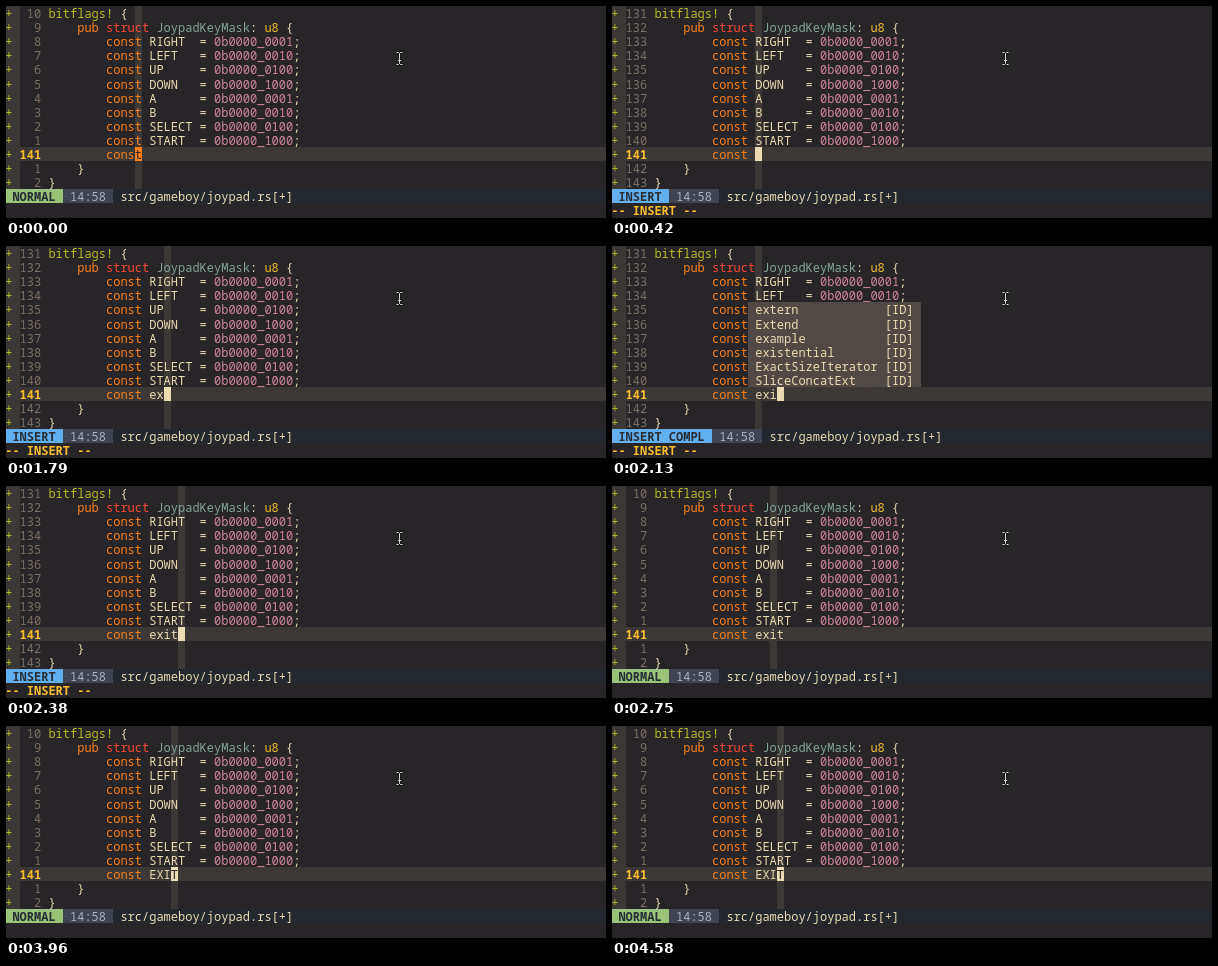
Recreate the animation shown at these times as an HTML page with a canvas. Size 600 by 212 pixels, loop 4.62 s.

```html
<!DOCTYPE html>
<html>
<head>
<meta charset="utf-8">
<style>
html, body { margin: 0; width: 100%; height: 100%; overflow: hidden; background: #272527; }
canvas { display: block; }
</style>
</head>
<body>
<canvas id="stage" width="600" height="212"></canvas>
<script>
const ctx = document.getElementById('stage').getContext('2d');
const LOOP = 4620, CW = 7.2, RH = 14.1, LEFT = -0.8, CURRENT = 10;
const C = {
  bg: '#272527', line: '#3c3836', menu: '#504945', fg: '#ebdbb2', dim: '#7c6f64',
  orange: '#fe8019', red: '#fb4934', yellow: '#fabd2f', green: '#b8bb26',
  blue: '#83a598', purple: '#d3869b',
  bar: '#23272e', clock: '#3e4452', normal: '#98c379', insert: '#61afef', dark: '#282c34'
};

const masks = ['RIGHT', 'LEFT', 'UP', 'DOWN', 'A', 'B', 'SELECT', 'START'];
const bits = ['0001', '0010', '0100', '1000'];
const matches = ['extern', 'Extend', 'example', 'existential', 'ExactSizeIterator', 'SliceConcatExt'];
const prompt = 'Select Inflection (p P C c t U T h S O o L - _):';

// Each step changes part of the editor state from the given time on.
const steps = [
  [0, { mode: 'NORMAL', word: '', cursor: 18, column: 18, menu: false, prompt: false }],
  [290, { mode: 'INSERT', cursor: 19, column: 19 }],
  [420, { cursor: 20, column: 20 }],
  [1540, { word: 'e', cursor: 21, column: 21 }],
  [1700, { word: 'ex', cursor: 22, column: 22 }],
  [1960, { mode: 'INSERT COMPL', menu: true, column: 20 }],
  [2110, { word: 'exi', cursor: 23 }],
  [2230, { mode: 'INSERT', menu: false, word: 'exit', cursor: 24, column: 24 }],
  [2730, { mode: 'NORMAL', cursor: -1, column: 22 }],
  [2780, { cursor: 23, column: 23 }],
  [3100, { prompt: true, cursor: -1 }],
  [3600, { prompt: false, word: 'EXIT', cursor: 23 }]
];

const x = col => LEFT + col * CW;
const y = row => row * RH;

function box(col, row, cols, rows, color) {
  const left = Math.max(0, Math.round(x(col))), top = Math.round(y(row));
  ctx.fillStyle = color;
  ctx.fillRect(left, top, Math.round(x(col + cols)) - left, Math.round(y(row + rows)) - top);
}

function text(col, row, string, color, bold) {
  ctx.font = (bold ? 'bold ' : '') + '12px "Noto Sans Mono", monospace';
  ctx.fillStyle = color;
  [...string].forEach((ch, i) => ctx.fillText(ch, x(col + i), Math.round(y(row)) + 12));
}

// Takes alternating strings and colours, set one after another.
function run(col, row, ...parts) {
  for (let i = 0; i < parts.length; i += 2) {
    text(col, row, parts[i], parts[i + 1]);
    col += parts[i].length;
  }
}

function gutter(insert) {
  box(0, 0, 2, 13, C.line);
  for (let row = 0; row < 13; row++) {
    text(0, row, '+', C.green);
    const here = row === CURRENT;
    const number = insert || here ? 131 + row : Math.abs(row - CURRENT);
    text(2, row, String(number).padStart(3), here ? C.yellow : C.dim, here);
  }
}

function code(word) {
  run(6, 0, 'bitflags!', C.green, ' {', C.fg);
  run(10, 1, 'pub ', C.orange, 'struct ', C.red, 'JoypadKeyMask', C.blue, ': ', C.fg, 'u8', C.yellow, ' {', C.fg);
  masks.forEach((name, i) => run(14, i + 2, 'const ', C.orange, name.padEnd(7) + '= ', C.fg,
    '0b0000_' + bits[i % 4], C.purple, ';', C.fg));
  run(14, CURRENT, 'const ', C.orange, word, C.fg);
  text(10, 11, '}', C.fg);
  text(6, 12, '}', C.fg);
}

function status(mode, insert) {
  const end = mode.length + 2;
  box(0, 13, 90, 1, C.bar);
  box(0, 13, end, 1, insert ? C.insert : C.normal);
  box(end, 13, 7, 1, C.clock);
  text(1, 13, mode, C.dark, true);
  text(end + 1, 13, '14:58', '#abb2bf');
  text(end + 8, 13, 'src/gameboy/joypad.rs[+]', C.fg);
}

function menu() {
  box(19, 4, 24, 6, C.menu);
  matches.forEach((name, i) => text(20, i + 4, name.padEnd(18) + '[ID]', C.fg));
}

function caret(s) {
  if (s.cursor < 0) return;
  const under = ('const ' + s.word)[s.cursor - 14];
  box(s.cursor, CURRENT, 1, 1, s.cursor === 18 ? C.orange : C.fg);
  if (under) text(s.cursor, CURRENT, under, C.bg);
}

function pointer() {
  const beam = new Path2D('M390.5 46.5h2l1 1l1-1h2M393.5 47.5v10M390.5 58.5h2l1-1l1 1h2M392 54.5h3');
  for (const [width, color] of [[2.4, '#151515'], [1, '#d8d8d8']]) {
    ctx.lineWidth = width;
    ctx.strokeStyle = color;
    ctx.stroke(beam);
  }
}

function draw(now) {
  const t = now % LOOP;
  const s = Object.assign({}, ...steps.filter(step => step[0] <= t).map(step => step[1]));
  const insert = s.mode !== 'NORMAL';
  ctx.fillStyle = C.bg;
  ctx.fillRect(0, 0, 600, 212);
  box(s.column, 0, 1, 13, C.line);
  box(0, CURRENT, 90, 1, C.line);
  gutter(insert);
  code(s.word);
  if (s.menu) menu();
  caret(s);
  status(s.mode, insert);
  if (insert) text(0, 14, '-- INSERT --', C.yellow, true);
  if (s.prompt) {
    text(0, 14, prompt, C.fg);
    box(prompt.length, 14, 1, 1, C.fg);
  }
  pointer();
  requestAnimationFrame(() => draw(performance.now()));
}
draw(0);
</script>
</body>
</html>
```
